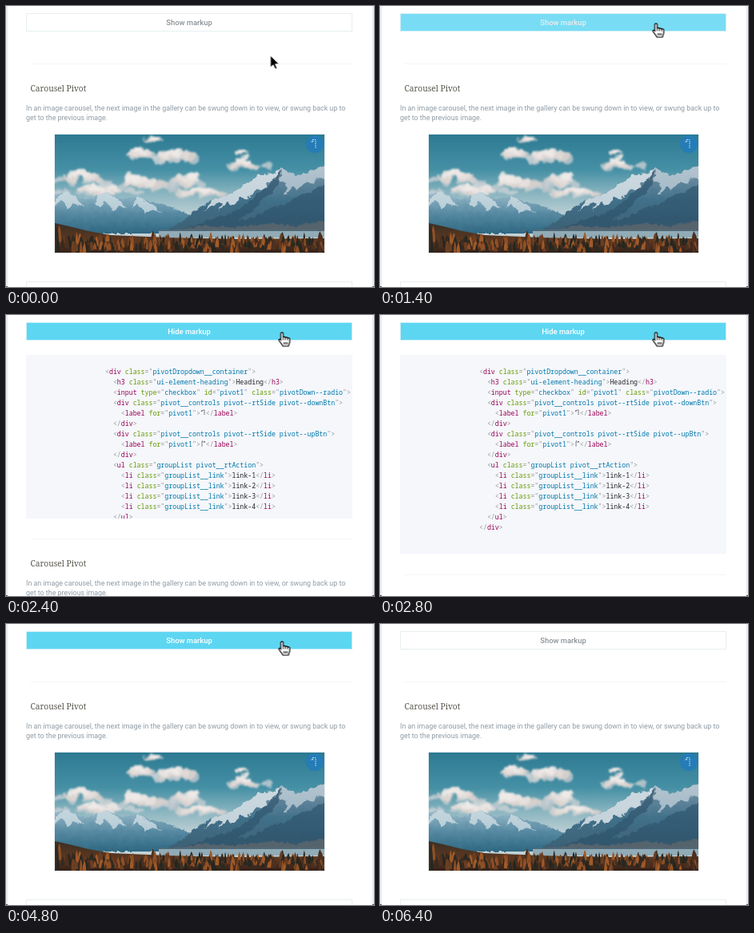
Animation, 460 px wide and 352 px high, one loop 6.47 s. Source, as an HTML page:

```html
<!DOCTYPE html>
<html lang="en">
<head>
<meta charset="utf-8">
<title>Carousel Pivot</title>
<style>
:root { --loop: 6470ms linear infinite; }
html, body { margin: 0; width: 100%; height: 100%; overflow: hidden; background: #eceff4; }
#stage {
  position: relative; width: 460px; height: 352px; overflow: hidden;
  background: linear-gradient(90deg, #e9edf3 2px, #fff 3px 457px, #e9edf3 458px);
  font-family: Roboto, "Open Sans", sans-serif;
}
#stage > *, #page > * { position: absolute; }
.corner { bottom: 0; width: 2px; height: 1px; background: #4b5058; }

.button {
  left: 25px; width: 406px; height: 20.5px; border: 1px solid #e8eff1;
  background: #fff; color: #8b9197; font: 500 9.4px/21px Roboto, sans-serif; text-align: center;
}
.button span { position: absolute; inset: 0; }
#toggle { top: 9px; animation: hover var(--loop); }
#toggle .show { animation: show var(--loop); }
#toggle .hide { animation: hide var(--loop); }
@keyframes hover {
  0%, 15.3% { background: #fff; color: #8b9197; border-color: #e8eff1; }
  22.9%, 82.6% { background: #5dd6f2; color: #fff; border-color: #cdeff8; }
  86.6% { background: #a9eaf8; color: #93a3ad; border-color: #cdeff8; }
  90%, 100% { background: #fff; color: #8b9197; border-color: #e8eff1; }
}
@keyframes show {
  0%, 32.9% { visibility: visible; }
  32.91%, 60.2% { visibility: hidden; }
  60.21%, 100% { visibility: visible; }
}
@keyframes hide {
  0%, 32.9% { visibility: hidden; }
  32.91%, 60.2% { visibility: visible; }
  60.21%, 100% { visibility: hidden; }
}

#markup {
  left: 25px; top: 50px; width: 408px; height: 0; overflow: hidden;
  background: #f5f7fb; animation: open var(--loop);
}
#page { left: 0; top: 0; width: 460px; height: 400px; animation: push var(--loop); }
@keyframes open {
  0%, 32.9% { height: 0; animation-timing-function: ease; }
  41%, 60.2% { height: 249px; animation-timing-function: ease; }
  68.3%, 100% { height: 0; }
}
@keyframes push {
  0%, 32.9% { transform: none; animation-timing-function: ease; }
  41%, 60.2% { transform: translateY(253px); animation-timing-function: ease; }
  68.3%, 100% { transform: none; }
}
pre {
  position: absolute; left: 99px; top: 13.5px; margin: 0; color: #222;
  font: 8.25px/13px "Noto Sans Mono", "DejaVu Sans Mono", monospace;
}
.p { color: #999; } .t { color: #990055; } .a { color: #669900; } .v { color: #0077aa; }
pre svg { width: 7px; height: 8px; vertical-align: 0; }

.rule { left: 31px; top: 72px; width: 402px; height: 1px; background: #f3f5f6; }
h2 { left: 30.5px; top: 96px; margin: 0; font: 300 10.2px/14px "Noto Serif", serif; color: #57554c; white-space: nowrap; }
p { left: 25px; top: 122px; margin: 0; font: 8.89px/12px Roboto, sans-serif; color: #8f9ba4; white-space: nowrap; }
#photo { left: 61px; top: 161px; outline: 1px solid #edf3f5; }

#cursor { left: 0; top: 0; width: 20px; height: 22px; animation: travel var(--loop); }
#cursor svg { position: absolute; overflow: visible; }
#arrow { animation: arrow var(--loop); }
#hand { left: -4.5px; top: -1px; animation: hand var(--loop); }
@keyframes travel {
  0%, 10.8% { transform: translate(330.5px, 62px); animation-timing-function: ease-in-out; }
  18.2%, 80.4% { transform: translate(344.5px, 22px); animation-timing-function: ease-in; }
  83.1% { transform: translate(342px, 45px); }
  86.55% { transform: translate(341.5px, 104px); }
  89.6% { transform: translate(343px, 200px); }
  93.6%, 99.99% { transform: translate(346px, 370px); }
  100% { transform: translate(330.5px, 62px); }
}
@keyframes arrow {
  0%, 15.3% { visibility: visible; }
  15.31%, 82% { visibility: hidden; }
  82.01%, 100% { visibility: visible; }
}
@keyframes hand {
  0%, 15.3% { visibility: hidden; }
  15.31%, 82% { visibility: visible; }
  82.01%, 100% { visibility: hidden; }
}
</style>
</head>
<body>
<div id="stage">
  <div id="page">
    <div class="rule"></div>
    <h2>Carousel Pivot</h2>
    <p>In an image carousel, the next image in the gallery can be swung down in to view, or swung back up to<br>get to the previous image.</p>
    <svg id="photo" width="337" height="148" viewBox="0 0 337 148">
      <defs>
        <linearGradient id="sky" x2="0" y2="1">
          <stop stop-color="#2c7a92"/><stop offset=".3" stop-color="#4690a5"/>
          <stop offset=".5" stop-color="#8ab5c0"/><stop offset=".7" stop-color="#c3d2d6"/>
        </linearGradient>
        <linearGradient id="far" x2="0" y2="1">
          <stop stop-color="#9dbccb"/><stop offset=".5" stop-color="#588ba3"/><stop offset="1" stop-color="#2f6781"/>
        </linearGradient>
        <linearGradient id="near" x2="0" y2="1">
          <stop stop-color="#7b96a8"/><stop offset=".5" stop-color="#41708a"/><stop offset="1" stop-color="#3c5f73"/>
        </linearGradient>
        <linearGradient id="wood" x2="0" y2="1">
          <stop stop-color="#3a2f24"/><stop offset=".6" stop-color="#5e3820"/><stop offset="1" stop-color="#33211a"/>
        </linearGradient>
        <filter id="soft" x="-10%" y="-20%" width="120%" height="140%">
          <feTurbulence type="fractalNoise" baseFrequency=".07" numOctaves="3" seed="4"/>
          <feDisplacementMap in="SourceGraphic" scale="14" xChannelSelector="R" yChannelSelector="G"/>
          <feGaussianBlur stdDeviation=".9"/>
        </filter>
        <filter id="rough">
          <feTurbulence type="fractalNoise" baseFrequency=".14" numOctaves="2" seed="8"/>
          <feDisplacementMap in="SourceGraphic" scale="7" xChannelSelector="R" yChannelSelector="G"/>
          <feGaussianBlur stdDeviation=".4"/>
        </filter>
      </defs>
      <rect width="337" height="148" fill="url(#sky)"/>
      <g id="clouds" filter="url(#soft)"></g>
      <g filter="url(#rough)">
        <path fill="url(#far)" d="M-6 77L14 72L28 78L42 81L56 76L66 73L84 80L103 78L122 85L140 89L155 95L170 101V124H-6Z"/>
        <path fill="#d3e0e6" opacity=".75" d="M56 76L66 73L78 80L90 92L80 89L74 96L64 84L57 91L50 87ZM103 78L118 86L134 97L121 94L112 99L106 88L96 91ZM14 72L28 80L35 91L23 87L17 94L9 82L0 88V80Z"/>
        <path fill="url(#near)" d="M138 122L160 108L174 97L198 81L220 75L238 61L256 51L271 49L284 42L295 49L309 51L323 44L333 40L343 42V124Z"/>
        <path fill="#dce5ea" opacity=".85" d="M284 42L276 55L267 60L262 68L252 70L240 80L233 79L222 88L215 86L204 94L210 84L199 88L186 95L198 81L220 75L238 61L256 51L271 49Z"/>
        <path fill="#cbd8e0" opacity=".7" d="M284 42L295 49L309 51L323 44L333 40L343 42V56L329 54L322 62L314 59L304 69L298 65L288 76L290 62L280 58Z"/>
        <path fill="#2c5069" opacity=".6" d="M284 45L281 61L270 75L260 80L247 96L229 107L250 104L270 91L288 88L307 75L320 72L343 60V118H160L202 104L222 99L246 82L265 65Z"/>
        <path fill="#5f676b" opacity=".75" d="M146 120L183 114L224 116L265 112L303 114L343 107V122Z"/>
      </g>
      <path fill="#91abb7" d="M130 120H337V129H130Z"/>
      <path fill="#526b78" d="M130 119.5H337V121H130Z"/>
      <path fill="url(#wood)" d="M0 111L18 115L42 121L70 126L140 129L230 131L337 130V148H0Z"/>
      <g id="trees"></g>
      <circle cx="325" cy="12" r="11" fill="#247cb8" opacity=".92"/>
      <path d="M320.5 9.5L322.5 6.5V10M322.5 6.5H326V17" fill="none" stroke="#c9e6f5" stroke-width="1" stroke-dasharray="1.6 .9"/>
    </svg>
    <div class="button" style="top:344.5px"><span>Show markup</span></div>
  </div>

  <div id="markup"><pre id="code"></pre></div>
  <div class="button" id="toggle"><span class="show">Show markup</span><span class="hide">Hide markup</span></div>
  <i class="corner" style="left:0"></i><i class="corner" style="right:0"></i>

  <div id="cursor">
    <svg id="arrow" width="12" height="18">
      <path d="M0 0V15L3.5 11.8L6 17L8.4 16L6.1 10.8H10.8Z" stroke="#fff" stroke-width=".9"/>
    </svg>
    <svg id="hand" width="16" height="19">
      <path d="M3 2.2C3 .5 6 .5 6 2.2V7C6.3 6 8.6 6 8.8 7.3C9.3 6.6 11.3 6.8 11.5 8C12.2 7.4 14.2 7.8 14.2 9.3V12.5C14.2 14.5 13 15.5 12.7 18H5.5C5 16 2 13.3 .8 11C0 9.3 1.7 8.6 3 10.2Z" fill="#fff" stroke="#000" stroke-width="1.2"/>
      <path d="M6 7V10.5M8.8 7.5V10.5M11.5 8.2V10.5M7 13V16M9 13V16M11 13V16" stroke="#000" stroke-width=".9"/>
    </svg>
  </div>
</div>

<script>
const $ = id => document.getElementById(id);

// Markup listing; ^ and ~ stand for the down and up icons
const links = [1, 2, 3, 4].map(n => `    <li class="groupList__link">link-${n}</li>`);
const control = (side, icon) => [
  `  <div class="pivot__controls pivot--rtSide pivot--${side}Btn">`,
  `    <label for="pivot1">${icon}</label>`,
  '  </div>'
];
const lines = [
  '<div class="pivotDropdown__container">',
  '  <h3 class="ui-element-heading">Heading</h3>',
  '  <input type="checkbox" id="pivot1" class="pivotDown--radio">',
  ...control('down', '^'),
  ...control('up', '~'),
  '  <ul class="groupList pivot__rtAction">',
  ...links,
  '  </ul>',
  '</div>'
];
const span = (kind, text) => `<span class="${kind}">${text}</span>`;
const icon = d => `<svg viewBox="0 0 7 8"><path d="${d}" fill="none" stroke="#333" stroke-width=".8" stroke-dasharray="1.5 .5"/></svg>`;
const icons = {
  '^': icon('M1 3L2.3 1V3.2M3.5 1H5V7.5'),
  '~': icon('M2 7.5V1H3.8M4 3L5 1L6 3')
};
const paintTag = (_, open, name, attrs) =>
  span('p', open.replace('<', '&lt;')) + span('t', name) +
  attrs.replace(/([\w-]+)="([^"]*)"/g, (_, key, value) =>
    span('a', key) + span('p', '="') + span('v', value) + span('p', '"')) +
  span('p', '&gt;');
$('code').innerHTML = lines.join('\n')
  .replace(/(<\/?)(\w+)([^>]*)>/g, paintTag)
  .replace(/[\^~]/g, c => icons[c]);

// Landscape details
let seed = 11;
const rand = () => (seed = seed * 16807 % 2147483647) / 2147483647;
const spread = () => rand() * 2 - 1;

// Cloud banks: centre x, centre y, half width, half height
const banks = [
  [60, 70, 75, 7], [185, 72, 50, 6], [32, 54, 38, 10], [100, 60, 55, 11],
  [168, 57, 26, 10], [105, 24, 28, 7], [150, 27, 38, 10],
  [238, 36, 34, 8], [124, 5, 16, 4], [232, 23, 9, 2]
];
const puff = ([x, y, w, h], i, n) => {
  const rise = 1 - 2 * i / n;
  const reach = w * (.5 + .4 * rise);
  const cx = x + spread() * reach, cy = y + rise * h * .6;
  const tint = `hsl(${20 + 180 * (rise > .4)} 14% ${85 - rise * 8}%)`;
  return `<ellipse cx="${cx}" cy="${cy}" rx="${w * .12 + 3}" ry="${h * .35 + 1}" fill="${tint}" opacity=".85"/>`;
};
$('clouds').innerHTML = banks.map(bank =>
  Array.from({ length: 18 }, (_, i) => puff(bank, i, 18)).join('')).join('');

const leaves = ['#25261f', '#6b3e22', '#8f5026', '#352a20', '#2b2a22', '#a05a28', '#4d301f'];
$('trees').innerHTML = Array.from({ length: 260 }, (_, i) => {
  const x = rand() * 337, base = 133 + i * .06 + rand() * 2;
  const top = base - 6 - rand() * 8 - Math.max(0, 40 - x) * .2;
  const half = 1.4 + rand() * 1.8;
  return `<path d="M${x - half} ${base}Q${x - half * .8} ${top + 3} ${x} ${top}Q${x + half * .8} ${top + 3} ${x + half} ${base}Z" fill="${leaves[i % 7]}"/>`;
}).join('');
</script>
</body>
</html>
```
